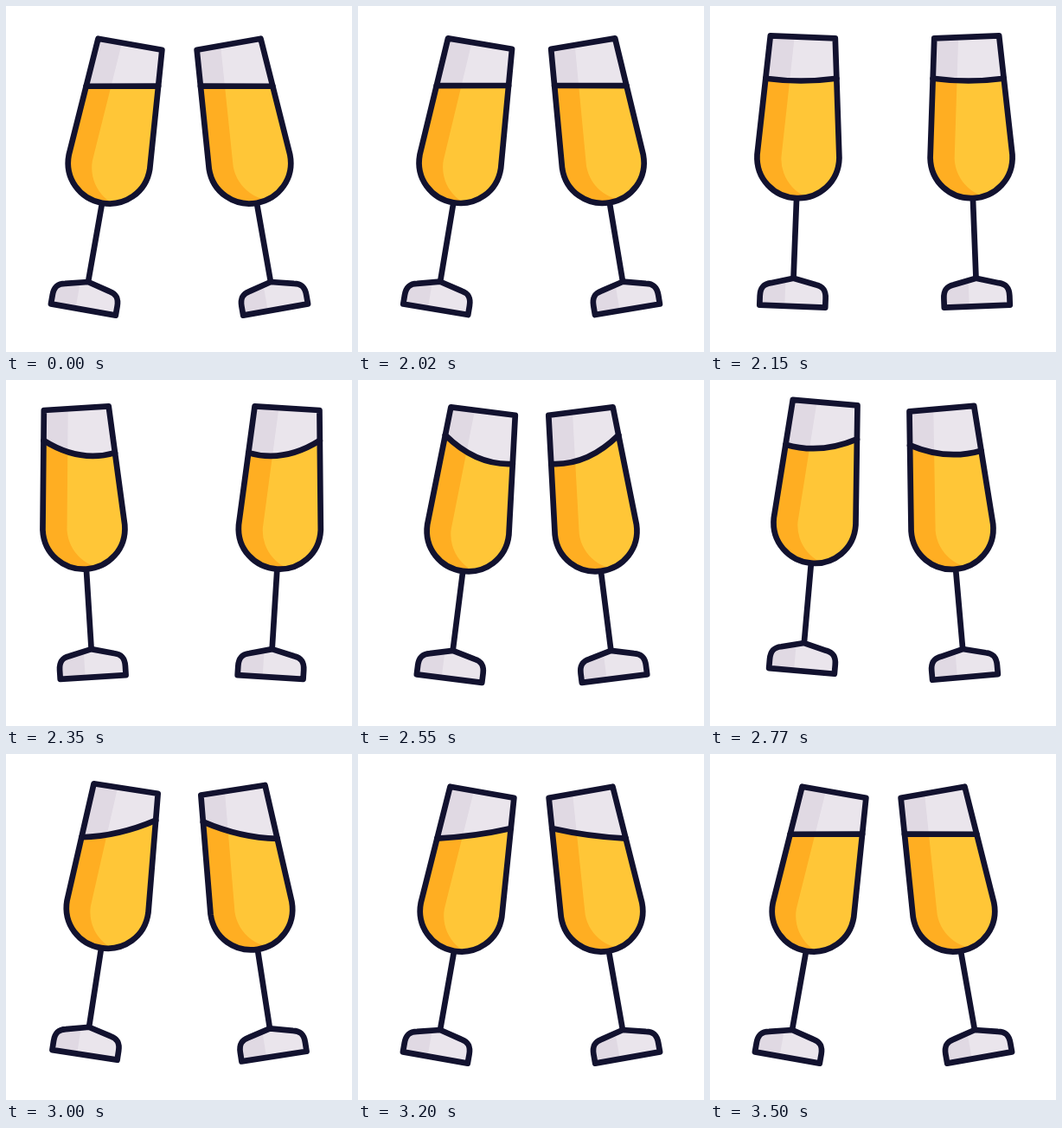
Write an HTML page that moves like this. It is 400x400 px and loops after 3.52 s.

```html
<!DOCTYPE html>
<html lang="en">
<head>
<meta charset="utf-8">
<title>Toast</title>
<style>
  html, body { margin: 0; width: 100%; height: 100%; overflow: hidden; background: #fff; }
  svg { display: block; width: 100vw; height: 100vh; }
  .ink { fill: none; stroke: #12122f; stroke-width: 6.7; stroke-linejoin: round; stroke-linecap: round; }
  .glass { fill: #eae5ec; }
  .glass-dark { fill: #e0d9e3; }
  .wine { fill: #ffc637; }
  .wine-dark { fill: #ffae22; }
</style>
</head>
<body>
<svg viewBox="0 0 400 400">
  <defs>
    <!-- local origin: where the stem meets the foot -->
    <path id="bowl" d="M-37.5 -279H37.5L47.5 -141C48 -113 26 -92.7 0 -92.7S-48 -113 -47.5 -141Z"/>
    <path id="foot" d="M-38 32.5V22C-38 12 -34 8 -26 6.5L0 0L26 6.5C34 8 38 12 38 22V32.5Z"/>
    <path id="shade" d="M-60 -290H-8.8L-19.5 -139A47.5 47.5 0 0 0 28 -91.5H-60Z"/>
    <clipPath id="in-bowl"><use href="#bowl"/></clipPath>
    <clipPath id="in-foot"><use href="#foot"/></clipPath>
    <clipPath id="in-shade"><use href="#shade"/></clipPath>
  </defs>
</svg>
<script>
const LOOP = 3520;
const APART = 2300, CLINK = 2650, RECOIL = 2770;
const REST_ANGLE = 10, LEVEL = -229.7, BOWL_WIDTH = 83;

const svg = document.querySelector('svg');

// side: 1 for the left glass, -1 for the right; hop: rise after the clink
function makeGlass(side, hop) {
  const g = document.createElementNS('http://www.w3.org/2000/svg', 'g');
  g.innerHTML = `
    <path class="ink" d="M0 -92V0"/>
    <g clip-path="url(#in-bowl)">
      <use href="#bowl" class="glass"/>
      <use href="#shade" class="glass-dark"/>
      <path class="wine" data-fill=""/>
      <g clip-path="url(#in-shade)"><path class="wine-dark" data-fill=""/></g>
    </g>
    <path class="ink" data-line=""/>
    <use href="#bowl" class="ink"/>
    <use href="#foot" class="glass"/>
    <path class="glass-dark" clip-path="url(#in-foot)" d="M-50 -5H-9V40H-50Z"/>
    <use href="#foot" class="ink"/>`;
  svg.append(g);
  return { g, side, hop, fills: g.querySelectorAll('[data-fill]'), line: g.querySelector('[data-line]') };
}

function ease(t, from, to) {
  const p = Math.min(1, Math.max(0, (t - from) / (to - from)));
  return p * p * (3 - 2 * p);
}

// 0 to 1 and back to 0
const bump = (t, from, peak, to) => ease(t, from, peak) - ease(t, peak, to);

const wall = y => 37.5 + (y + 279) * 10 / 138;

function pose({ g, side, hop, fills, line }, t) {
  const swing = bump(t, 1985, APART, CLINK);
  const reach = bump(t, APART, CLINK, 3060);
  const lift = bump(t, 1985, APART, 3100);
  const recoil = bump(t, CLINK, RECOIL, 3110);

  const lean = REST_ANGLE - 14.4 * swing - 5 * recoil;
  const x = 200.5 - side * (105.5 - 17.5 * reach) + 2.8 * swing;
  const y = 319 - 8 * lift - hop * recoil;
  g.setAttribute('transform', `translate(${x} ${y}) rotate(${side * lean})`);

  // The wine runs up the outer wall, then the inner one, and settles level
  const slosh = 34 * bump(t, 2200, 2540, 2760) - 20 * bump(t, 2660, 2960, 3500);
  const sag = 10 * bump(t, 2020, 2400, 3500);
  const mid = LEVEL - 0.5 * sag;
  const tilt = side * (slosh - BOWL_WIDTH * Math.tan(lean * Math.PI / 180));
  const a = mid - tilt / 2, b = mid + tilt / 2;
  const surface = `M${-wall(a)} ${a}Q0 ${mid + 2 * sag} ${wall(b)} ${b}`;
  line.setAttribute('d', surface);
  fills.forEach(f => f.setAttribute('d', surface + 'L60 -80H-60Z'));
}

const glasses = [makeGlass(1, 12), makeGlass(-1, 5)];
const start = performance.now();

function frame() {
  const t = Math.max(0, performance.now() - start) % LOOP;
  glasses.forEach(glass => pose(glass, t));
  requestAnimationFrame(frame);
}
frame();
</script>
</body>
</html>
```
